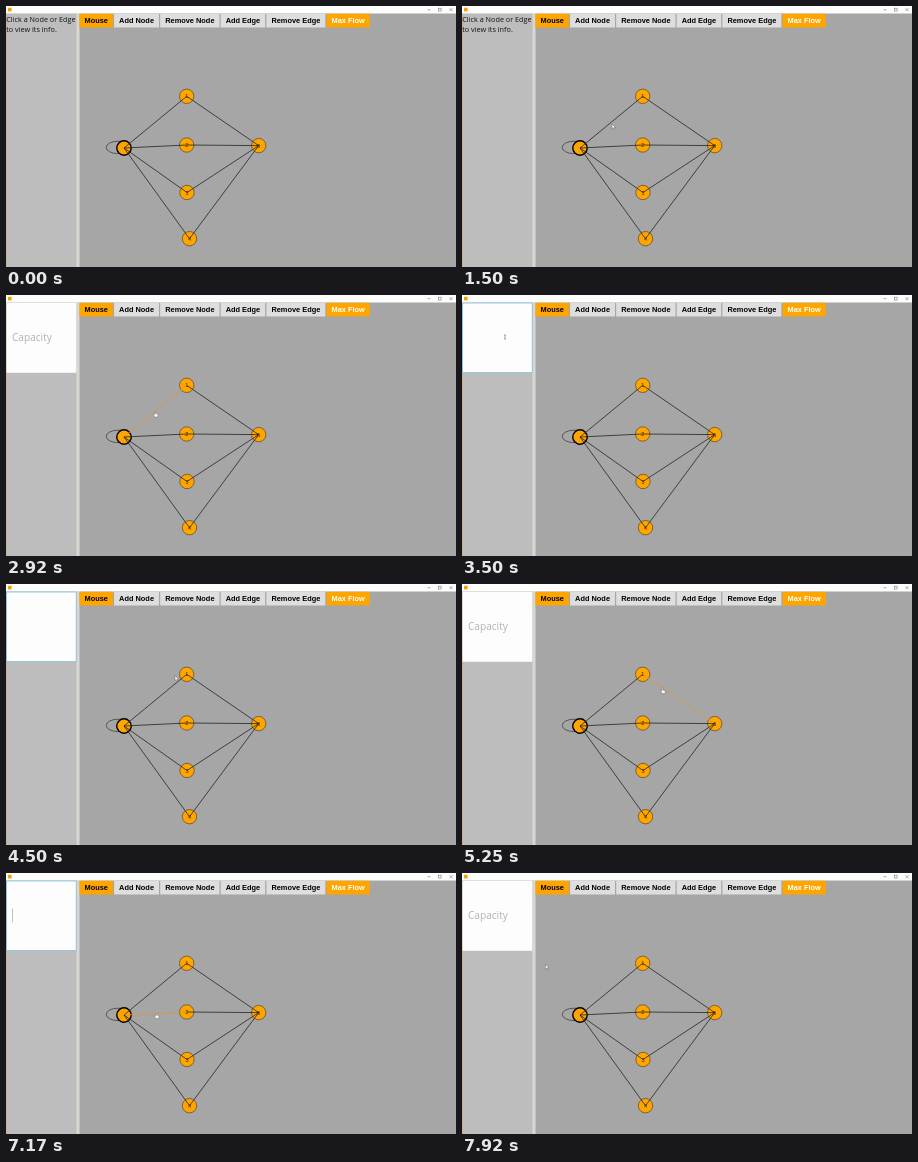
Animation, 450 px wide and 261 px high, one loop 8 s. Source, as an HTML page:

```html
<!DOCTYPE html>
<html lang="en">
<head>
<meta charset="utf-8">
<title>Flow editor</title>
<style>
  html, body { margin: 0; width: 100%; height: 100%; overflow: hidden; background: #a6a6a6; }
  svg { display: block; width: 450px; height: 261px; }
  .ui { font-family: "Open Sans", "Noto Sans", sans-serif; }
  .tab { font: bold 7.4px "Liberation Sans", Arial, sans-serif; }
  .label { font: 5.5px "Liberation Sans", Arial, sans-serif; text-anchor: middle; fill: #3a2600; }
</style>
</head>
<body>
<svg viewBox="0 0 450 261">
  <rect width="450" height="261" fill="#a6a6a6"/>
  <rect y="7.5" width="71" height="254" fill="#bdbdbd"/>
  <rect x="70.5" y="7.5" width="3" height="254" fill="#d9d7d2"/>
  <rect y="7.5" width=".6" height="254" fill="#c9a76a"/>
  <rect width="450" height="7.5" fill="#fdfdfd"/>
  <rect x="2" y="1.8" width="3.6" height="3.6" fill="#f5a000"/>
  <g fill="none" stroke="#777" stroke-width=".6">
    <path d="M421.500 3.700h3M443.500 2.200l3 3m0-3l-3 3"/>
    <rect x="432.300" y="2.200" width="2.800" height="2.800"/>
  </g>
  <g id="tabs"></g>
  <g id="hint" class="ui" font-size="7.25" fill="#111">
    <text x=".3" y="16.2">Click a Node or Edge</text>
    <text x=".3" y="26">to view its info.</text>
  </g>
  <g id="field">
    <rect x=".5" y="7.8" width="69.8" height="70" fill="#fdfdfd"/>
    <rect id="focus" x=".6" y="8" width="69.6" height="69.6" fill="none" stroke="#7cbfd9" stroke-width=".8"/>
    <text id="prompt" class="ui" x="6" y="46.3" font-size="10.1" fill="#b2b2b2">Capacity</text>
    <path id="caret" d="M6.500 35.500v14" stroke="#999" stroke-width=".6"/>
  </g>
  <g id="graph"></g>
  <g id="cursor" stroke="#444" stroke-width=".35" fill="#fff">
    <path id="arrow" d="M0 0v4.600l1.100-1 .8 1.700.8-.4-.8-1.600h1.500z"/>
    <path id="hand" d="M-.4 0q.7-.7 1 .2v1.600l2 .5q.5.2.4 1l-.4 2h-2.600l-1.600-2.200q.2-.8 1.200-.1z"/>
    <path id="beam" d="M-.8-2h1.600M0-2v4M-.8 2h1.600" fill="none" stroke-width=".5"/>
  </g>
</svg>
<script>
const LOOP = 8000, STEP = 1000 / 12;
const $ = id => document.getElementById(id);
const show = (id, on) => $(id).setAttribute("visibility", on ? "visible" : "hidden");

function add(parent, tag, attrs, text) {
  const el = document.createElementNS("http://www.w3.org/2000/svg", tag);
  for (const k in attrs) el.setAttribute(k, attrs[k]);
  if (text) el.textContent = text;
  return parent.appendChild(el);
}

// Tabs fit their labels and sit in a row.
let left = 73.5;
for (const name of ["Mouse", "Add Node", "Remove Node", "Add Edge", "Remove Edge", "Max Flow"]) {
  const fill = name[0] === "M" ? "#ffa500" : "#dedede";
  const box = add($("tabs"), "rect", { x: left, y: 7.8, height: 13.7, fill });
  const text = add($("tabs"), "text", {
    x: left + 5, y: 17.2, class: "tab", fill: name === "Max Flow" ? "#fff" : "#000"
  }, name);
  const width = text.getComputedTextLength() + 10;
  box.setAttribute("width", width);
  left += width + 1.2;
}

const source = { x: 118, y: 142 }, sink = { x: 252.7, y: 139.6 };
const middle = [{ x: 180.7, y: 90.3 }, { x: 180.7, y: 139 }, { x: 181, y: 186.5 }, { x: 183.5, y: 232.7 }];
const graph = $("graph");

add(graph, "ellipse", {
  cx: 112, cy: 141.4, rx: 11.8, ry: 6.2, fill: "none", stroke: "#333", "stroke-width": .7
});
[source, ...middle, sink].forEach((n, i) => {
  add(graph, "circle", {
    cx: n.x, cy: n.y, r: 7.2, fill: "#ffa500",
    stroke: i ? "#5a4520" : "#000", "stroke-width": i ? .7 : 1.4
  });
  if (i) add(graph, "text", { x: n.x, y: n.y + 2, class: "label" }, String(i));
});

const edges = middle.flatMap(m => [[source, m], [m, sink]]).map(([a, b]) => ({
  a, b, line: add(graph, "line", { x1: a.x, y1: a.y, x2: b.x, y2: b.y })
}));

function distance({ a, b }, p) {
  const dx = b.x - a.x, dy = b.y - a.y, len = dx * dx + dy * dy;
  const u = Math.min(1, Math.max(0, ((p.x - a.x) * dx + (p.y - a.y) * dy) / len));
  return Math.hypot(a.x + u * dx - p.x, a.y + u * dy - p.y);
}

// Pointer moves: start, end, x, y. It rests between them.
const moves = [
  [580, 1330, 150, 118.2], [1920, 2080, 148.9, 116.8], [2930, 3330, 43, 42],
  [4000, 4700, 200.2, 104.2], [5270, 5670, 35, 55], [6250, 6830, 150, 140.3],
  [7430, 7900, 83.5, 91.5]
];
// Clicks alternate between an edge and the text field.
const clicks = [2900, 3490, 4740, 5830, 7400];

function pointer(t) {
  let x = 206, y = 268;
  for (const [start, end, toX, toY] of moves) {
    const u = Math.min(1, Math.max(0, (t - start) / (end - start)));
    const k = u * u * (3 - 2 * u);
    x += (toX - x) * k;
    y += (toY - y) * k;
  }
  return { x, y };
}

function render(t) {
  const p = pointer(t);
  const hover = edges.find(e => distance(e, p) < 1.2);
  for (const e of edges) {
    e.line.setAttribute("stroke", e === hover ? "#dc9a2a" : "#1c1c1c");
    e.line.setAttribute("stroke-width", .75);
  }

  const done = clicks.filter(c => c <= t);
  const open = done.length > 0;
  const focus = open && done.length % 2 === 0;
  const blink = Math.floor((t - done[done.length - 1] + 420) / 500) % 2 === 1;
  show("hint", !open);
  show("field", open);
  $("field").firstElementChild.setAttribute("visibility", open ? "visible" : "hidden");
  show("focus", focus);
  show("prompt", open && !focus);
  show("caret", focus && blink);

  const inField = open && p.x < 70 && p.y < 78;
  $("cursor").setAttribute("transform", `translate(${p.x.toFixed(2)} ${p.y.toFixed(2)})`);
  show("beam", inField);
  show("hand", hover && !inField);
  show("arrow", !hover && !inField);
}

function tick(now) {
  const t = now % LOOP;
  render(Math.floor((t + 4) / STEP) * STEP);
  requestAnimationFrame(tick);
}
render(0);
requestAnimationFrame(tick);
</script>
</body>
</html>
```
